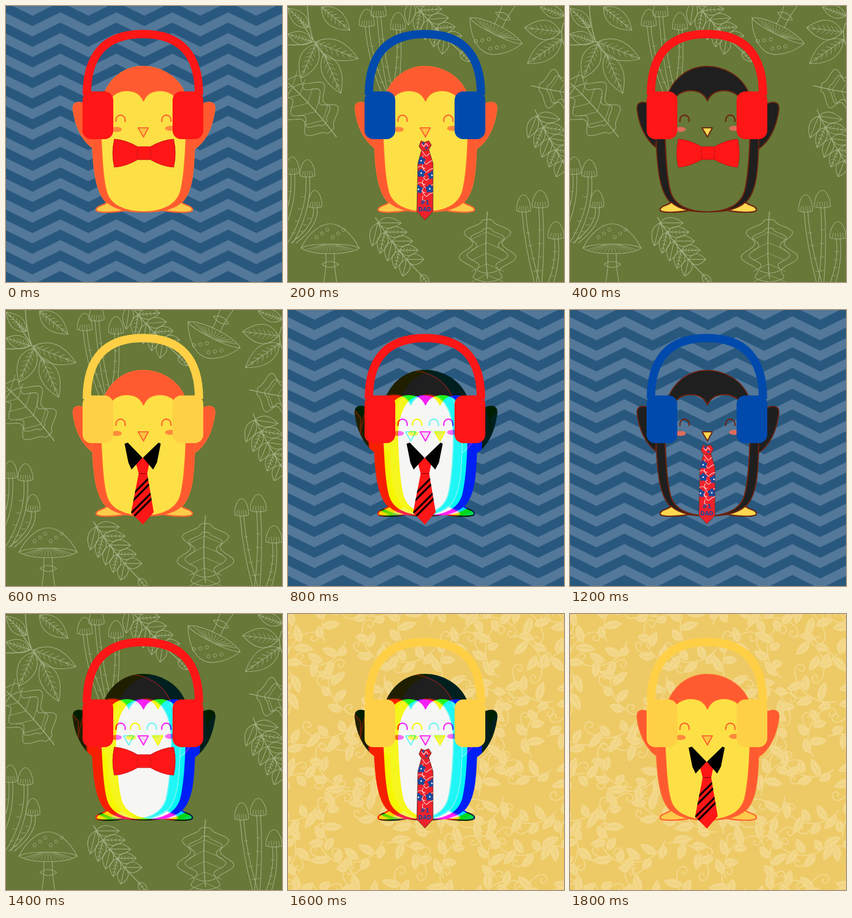
An HTML page with a canvas that plays this animation: 512 px wide and 512 px high, repeating every 2 s.

```html
<!DOCTYPE html>
<html>
<head>
<meta charset="utf-8">
<style>
  html, body { margin: 0; width: 100%; height: 100%; overflow: hidden; }
  canvas { display: block; }
</style>
</head>
<body>
<canvas id="stage" width="512" height="512"></canvas>
<script>
const SIZE = 512, STEP = 200;
const RED = '#ff1616', BLUE = '#004aad', YELLOW = '#ffd045';

const newCanvas = () => Object.assign(document.createElement('canvas'), { width: SIZE, height: SIZE });
const stage = document.getElementById('stage').getContext('2d');
let g = stage; // context that the helpers draw on

function drawOn(ctx, fn) {
  const previous = g;
  g = ctx;
  fn();
  g = previous;
}

function at(x, y, angle, fn) {
  g.save();
  g.translate(x, y);
  g.rotate(angle);
  fn();
  g.restore();
}

function shape(d, fill, stroke, width = 1) {
  const path = new Path2D(d);
  if (fill) { g.fillStyle = fill; g.fill(path, 'evenodd'); }
  if (stroke) { g.strokeStyle = stroke; g.lineWidth = width; g.stroke(path); }
}

function flood(color) {
  g.fillStyle = color;
  g.fillRect(0, 0, SIZE, SIZE);
}

// ---------- backgrounds ----------

function chevrons() {
  const half = 51.9, drop = 25.5, thickness = 19;
  flood('#29587f');
  g.fillStyle = '#537899';
  for (let top = -65; top < SIZE; top += 38.4) {
    const edge = [];
    for (let i = -1; i < 11; i++) edge.push([49 + half * i, top + (i % 2 ? 0 : drop)]);
    g.beginPath();
    edge.forEach(([x, y]) => g.lineTo(x, y));
    edge.reverse().forEach(([x, y]) => g.lineTo(x, y + thickness));
    g.fill();
  }
}

const INK = '#a3ae82';
const ink = (d, width = 1.2) => shape(d, '', INK, width);

function leaf(x1, y1, x2, y2, w, veins = 7) {
  const len = Math.hypot(x2 - x1, y2 - y1);
  at(x1, y1, Math.atan2(y2 - y1, x2 - x1), () => {
    ink(`M0,0Q${len * .4},${-w} ${len},0Q${len * .4},${w} 0,0M0,0H${len}`);
    for (let i = 1; i <= veins; i++) {
      const t = i / (veins + 1);
      const x = len * (.8 * t * (1 - t) + t * t), y = 2 * t * (1 - t) * w;
      const half = y / 2 + y * 0;
      ink(`M${x},${-half}L${x - len * .1},0L${x},${half}`, .9);
    }
  });
}

function fern(x, y, angle, len, pairs) {
  at(x, y, angle, () => {
    ink(`M0,0Q${len / 2},8 ${len},0`, 1.5);
    for (let i = 0; i < pairs; i++) {
      const p = len * (.08 + .8 * i / pairs), size = 44 - 3 * i;
      for (const side of [-1, 1]) leaf(p, 3, p + size * .62, 3 + side * size * .78, 20, i % 2 ? 5 : 0);
    }
    leaf(len, 0, len + 26, 0, 14, 3);
  });
}

function slimMushroom(x, y, foot, bottom, w) {
  ink(`M${x - 3},${y}Q${x + 2},${(y + bottom) / 2} ${foot - 5},${bottom}M${x + 4},${y}Q${x + 9},${(y + bottom) / 2} ${foot + 5},${bottom}`);
  ink(`M${x - w},${y}C${x - w},${y - 20} ${x - 5},${y - 30} ${x},${y - 30}C${x + 5},${y - 30} ${x + w},${y - 20} ${x + w},${y}Q${x},${y + 5} ${x - w},${y}`);
  for (let i = -2; i < 3; i++) ink(`M${x + i * w * .35},${y}L${x + i * w * .28},${y - 9}`, .9);
  for (let t = .3; t < 1; t += .18) {
    const cx = x + (foot - x) * t, cy = y + (bottom - y) * t;
    ink(`M${cx - 3},${cy}q4,4 8,0`, .9);
  }
}

function wideMushroom(x, y, angle, stem) {
  at(x, y, angle, () => {
    ink('M-54,0C-40,-28 -18,-45 0,-45C18,-45 40,-28 54,0C40,-10 -40,-10 -54,0C-35,14 35,14 54,0');
    for (let i = -6; i <= 6; i++) ink(`M${i * 2},-7L${i * 7.4},${9 - Math.abs(i)}`, .8);
    for (let i = 0; i < 6; i++) {
      const cx = -25 + i * 10, cy = -20 - (i % 3) * 7;
      ink(`M${cx - 3},${cy}a3,3 0 1 0 6,0a3,3 0 1 0 -6,0`, .9);
    }
    ink(`M-8,9Q-6,${stem / 2} -12,${stem}M8,9Q7,${stem / 2} 13,${stem}M-15,30Q0,20 16,30Q0,42 -15,30`);
  });
}

function oakLeaf(x, y, angle, len, w) {
  at(x, y, angle, () => {
    for (const scale of [1, .72]) {
      let d = '';
      for (let i = 0; i <= 120; i++) {
        const a = i / 60 * Math.PI;
        const lobes = .82 + .26 * Math.cos(7 * a);
        d += `${i ? 'L' : 'M'}${len / 2 * (1 - Math.cos(a) * scale)},${w * scale * lobes * Math.sin(a)}`;
      }
      ink(d);
    }
    ink(`M-15,0Q${len / 2},6 ${len * .95},0`, 1.6);
    for (let t = .2; t < .9; t += .17) ink(`M${len * (t + .12)},${-w * .6}L${len * t},2L${len * (t + .12)},${w * .6}`, .9);
  });
}

function forest() {
  flood('#677838');
  ink('M36,0Q38,40 48,66Q60,78 72,98M0,72Q24,74 48,66M48,66L20,22', 1.6);
  leaf(62, 2, 115, 45, 32);
  leaf(38, 40, 0, 4, 24);
  leaf(50, 67, 130, 98, 36);
  leaf(66, 88, 98, 162, 34);
  leaf(52, 70, 24, 134, 34);
  leaf(44, 66, 0, 52, 24);
  ink('M512,30Q503,50 512,72', 1.6);
  leaf(512, 18, 468, 2, 22);
  leaf(506, 48, 439, 40, 36);
  leaf(508, 62, 444, 107, 34);
  slimMushroom(146, 36, 178, 160, 14);
  slimMushroom(168, 18, 190, 160, 14);
  slimMushroom(204, 42, 200, 150, 14);
  fern(224, -18, .82, 140, 5);
  wideMushroom(386, 46, 3.6, 60);
  oakLeaf(466, 150, .15, 105, 42);
  fern(458, 192, 1.05, 150, 5);
  oakLeaf(80, 232, -2.3, 125, 46);
  slimMushroom(8, 310, -14, 420, 13);
  slimMushroom(36, 315, 4, 440, 14);
  slimMushroom(50, 372, 10, 440, 13);
  wideMushroom(78, 449, 0, 66);
  fern(162, 392, .9, 135, 5);
  oakLeaf(370, 396, 1.57, 116, 50);
  slimMushroom(437, 380, 462, 512, 13);
  slimMushroom(468, 372, 466, 512, 15);
  slimMushroom(497, 430, 488, 512, 15);
}

function damask() {
  const ground = '#edca66', light = '#f3d88b';
  let seed = 11;
  const random = () => (seed = seed * 16807 % 2147483647) / 2147483647;
  flood(ground);
  for (let row = 0; row < 8; row++) for (let col = 0; col < 8; col++) {
    const x = col * 74 - 10 + random() * 24, y = row * 74 - 10 + random() * 24;
    at(x, y, random() * 6.28, () => {
      shape('M-45,18C-20,-12 20,-12 46,10C58,22 50,36 40,30C33,24 40,17 45,22M0,-5C8,-26 28,-30 30,-18C30,-10 21,-11 22,-17', '', light, 2.2);
      for (let i = 0; i < 5; i++) {
        const side = i % 2 ? 1 : -1;
        at(-40 + i * 16, 10 - Math.sin(i / 4 * 3) * 14, side * (.7 + random() * .5), () => {
          const len = 22 + random() * 18;
          shape(`M0,0C${len * .2},-13 ${len * .7},-11 ${len},2C${len * .7},9 ${len * .3},10 0,0`, light);
          shape(`M2,0Q${len / 2},-3 ${len * .85},1`, '', ground, .8);
        });
      }
    });
  }
}

const [WAVES, FOREST, DAMASK] = [chevrons, forest, damask].map(paint => {
  const canvas = newCanvas();
  drawOn(canvas.getContext('2d'), paint);
  return canvas;
});

// ---------- penguin ----------

const BODY = 'M181,165C194,131 222,112 254,112C287,112 318,130 331,160Q350,205 350,250C349,305 346,345 326,364C306,380 282,382 255,382C228,382 206,380 186,364C167,345 162,305 160,250Q160,205 181,165Z';
const BELLY = 'M255,176C249,162 237,157 224,157C192,157 176,190 176,240C178,275 179,315 186,343C193,371 222,382 255,382C288,382 316,371 324,343C331,315 333,275 334,240C334,190 318,157 286,157C273,157 261,162 255,176Z';
const WINGS = 'M146,181C131,175 122,180 125,195C128,218 138,246 159,262L162,200ZM366,181C381,175 390,180 387,195C383,221 373,249 350,265L349,200Z';
const FEET = 'M188,364C180,371 168,370 167,378C167,385 203,383 222,379Q200,375 188,364ZM325,364C333,371 345,370 346,378C346,385 309,383 291,379Q313,375 325,364Z';
const EYES = 'M204,214v-3a8.5,8.5 0 0 1 17,0v3M289,214v-3a8.5,8.5 0 0 1 17,0v3';
const CHEEKS = 'M195,229a10,4.7 0 1 0 20,0a10,4.7 0 1 0 -20,0M295,227a10,4.7 0 1 0 20,0a10,4.7 0 1 0 -20,0';

const FIERY = { coat: '#ff5a30', line: '#ff6430', belly: '#fce045', feet: '#fdcb4a', cheek: '#ff8a3c', beak: '#fcc33f' };
const DARK = { coat: '#1f1f1f', line: '#6b2410', belly: '', feet: '#ffd84f', cheek: '#de6c5c', beak: '#ffd84f' };
const PALE = { ...DARK, belly: '#f6f6f5' };

function bird({ coat, line, belly, feet, cheek, beak }) {
  g.lineJoin = g.lineCap = 'round';
  shape(WINGS, coat, line, 2);
  shape(BODY + BELLY, coat, line, 2);
  shape(BELLY, belly, line, 2);
  shape(FEET, feet, line, 2.4);
  shape(CHEEKS, cheek);
  shape(EYES, '', line, 2.4);
  shape('M245,226H264L255,243Z', beak, line, 2.2);
}

// red and blue channels slide apart inside the silhouette
function makePrism() {
  const result = newCanvas(), out = result.getContext('2d');
  [['#f00', -27], ['#0f0', 0], ['#00f', 27]].forEach(([channel, shift]) => {
    const layer = newCanvas();
    drawOn(layer.getContext('2d'), () => {
      flood('#000');
      at(shift, 0, 0, () => bird(PALE));
      g.globalCompositeOperation = 'multiply';
      flood(channel);
    });
    out.globalCompositeOperation = 'lighter';
    out.drawImage(layer, 0, 0);
  });
  const mask = newCanvas();
  drawOn(mask.getContext('2d'), () => bird(PALE));
  out.globalCompositeOperation = 'destination-in';
  out.drawImage(mask, 0, 0);
  return result;
}

const prism = makePrism();
const fiery = () => bird(FIERY);
const dark = () => bird(DARK);
const split = () => g.drawImage(prism, 0, 0);

// ---------- accessories ----------

function headphones(color) {
  g.lineCap = 'butt';
  shape('M150,165C150,90 184,52 254,52C324,52 358,90 358,165', '', color, 15.5);
  g.fillStyle = color;
  for (const x of [142, 309]) {
    g.beginPath();
    g.roundRect(x, 158.5, 57, 88.5, 16);
    g.fill();
  }
}

function bowTie() {
  const edge = '#c41218';
  shape('M201,247Q222,248 246,262V284Q222,298 201,299Q195,273 201,247ZM311,247Q290,248 266,262V284Q290,298 311,299Q317,273 311,247Z', RED, edge);
  shape('M245,261H267Q270,273 267,285H245Q242,273 245,261Z', RED, edge);
}

function collarTie() {
  shape('M241,284L253,274L266,284L262,303H246Z', RED);
  g.save();
  const blade = 'M246,304H262L274,375L254,398L232,376Z';
  shape(blade, RED);
  g.clip(new Path2D(blade));
  for (const sum of [577, 589, 609, 620]) shape(`M${sum - 300},300L${sum - 400},400`, '', '#000', 3.5);
  g.restore();
  shape('M246,303.5H262', '', '#600');
  shape('M220,248L226,246L253,274L233,296L227,283ZM287,248L283,246L254,274L273,296L280,283Z', '#000');
}

function printedTie() {
  const red = '#ee222c', blue = '#174a9c', edge = '#5b3328';
  const blade = 'M248,266H261L269,292V381L254,397L239,381L241,292Z';
  shape(blade, red, edge);
  shape('M247,250L253,253L261,250L266,258L260,268H248L243,260Z', red, edge);
  g.save();
  g.clip(new Path2D(blade));
  for (let y = 272; y < 360; y += 15) shape(`M238,${y}q8,-9 13,0t8,5t12,-6m-20,6q-5,9 4,9`, '', '#ffd9d6', 1.2);
  for (const [x, y] of [[247, 287], [247, 310], [267, 314], [263, 339], [242, 340]]) {
    for (let i = 0; i < 5; i++) at(x, y, i * 1.257, () => shape('M0,0C-5,-4 -3,-8 0,-8C3,-8 5,-4 0,0', blue));
    shape(`M${x - 1.5},${y}a1.5,1.5 0 1 0 3,0a1.5,1.5 0 1 0 -3,0`, '#fff');
  }
  g.restore();
  shape('M248,256l4,5l4,-6l4,5', '', '#fff', 1.2);
  shape('M249,253h4v4h-4ZM255,261h4v4h-4Z', blue);
  g.fillStyle = blue;
  g.textAlign = 'center';
  g.font = 'bold 11px "DejaVu Sans", sans-serif';
  g.fillText('#1', 254, 368);
  g.font = 'bold 10px "DejaVu Sans", sans-serif';
  g.fillText('DAD', 254, 381);
}

// ---------- outfits, one per step ----------

const outfits = [
  [WAVES, fiery, RED, bowTie],
  [FOREST, fiery, BLUE, printedTie],
  [FOREST, dark, RED, bowTie],
  [FOREST, fiery, YELLOW, collarTie],
  [WAVES, split, RED, collarTie],
  [DAMASK, dark, RED, collarTie],
  [WAVES, dark, BLUE, printedTie],
  [FOREST, split, RED, bowTie],
  [DAMASK, split, YELLOW, printedTie],
  [DAMASK, fiery, YELLOW, collarTie],
];

let shown = -1;
const start = performance.now();

function tick() {
  const index = Math.floor((performance.now() - start) / STEP) % outfits.length;
  if (index !== shown) {
    shown = index;
    const [backdrop, penguin, phones, tie] = outfits[index];
    stage.drawImage(backdrop, 0, 0);
    penguin();
    headphones(phones);
    tie();
  }
  requestAnimationFrame(tick);
}
tick();
</script>
</body>
</html>
```
